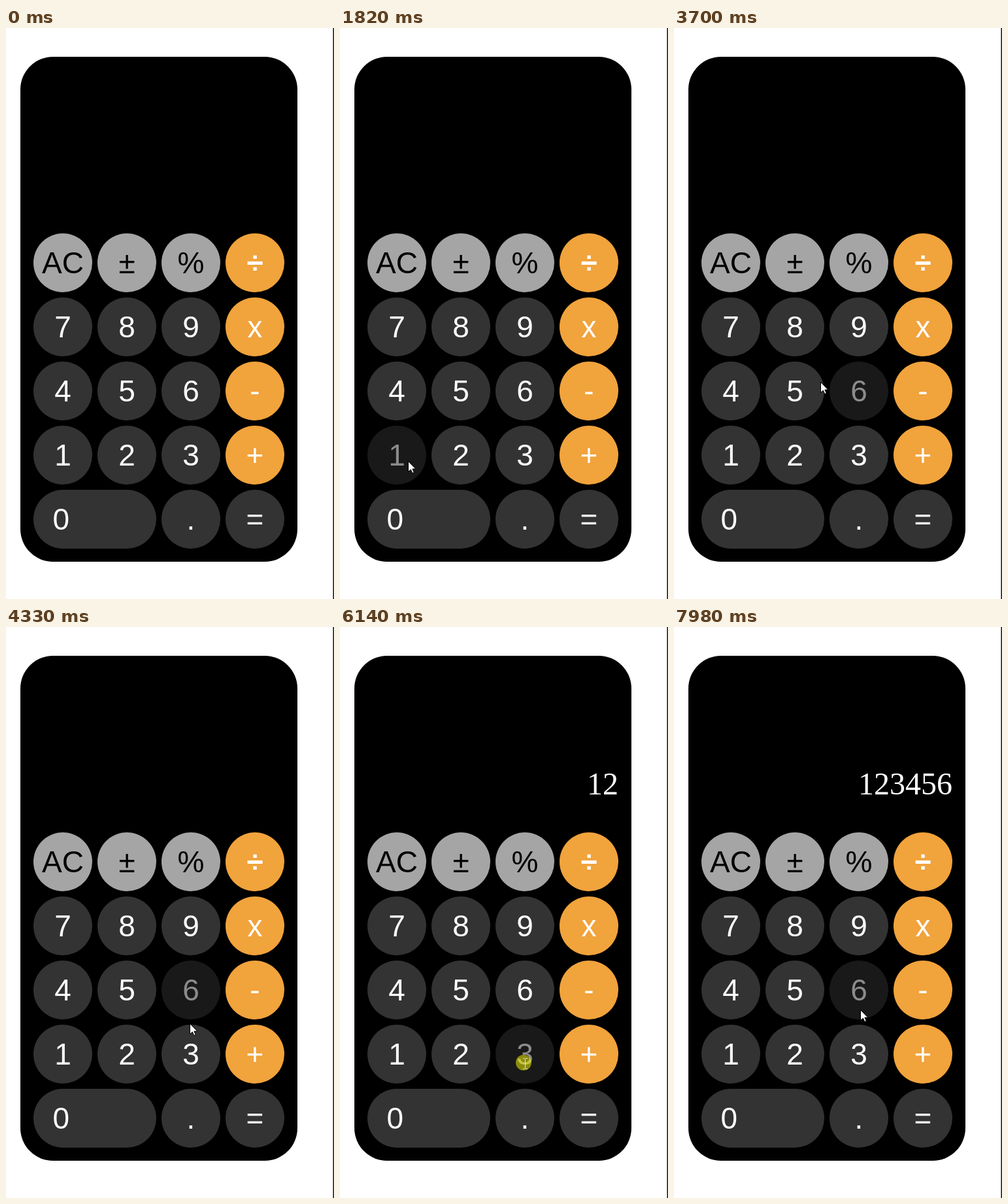
Animation of 502 by 873 pixels, one loop 8000 ms. Source, as an HTML page with a canvas:

```html
<!DOCTYPE html>
<html lang="en">
<head>
<meta charset="utf-8">
<title>Calculator</title>
<style>
html, body { margin: 0; width: 100%; height: 100%; overflow: hidden; background: #fff; }
canvas { display: block; }
</style>
</head>
<body>
<canvas id="stage" width="502" height="873"></canvas>
<script>
const ctx = document.getElementById('stage').getContext('2d');
const LOOP = 8000, STEP = 70, CLICK = 120;
const SIZE = 90, R = SIZE / 2, PITCH = 98, LEFT = 42, TOP = 314;
const GRAY = '#a5a5a5', ORANGE = '#f1a33c', DARK = '#333333';

const rows = ['A±%÷', '789x', '456-', '123+', '0 .='];
const keys = rows.flatMap((row, r) => [...row].map((char, c) => ({
  label: char === 'A' ? 'AC' : char,
  x: LEFT + c * PITCH,
  y: TOP + r * PITCH,
  w: char === '0' ? SIZE + PITCH : SIZE,
  fill: char === '=' ? DARK : c === 3 ? ORANGE : r === 0 ? GRAY : DARK,
  ink: r === 0 && c < 3 ? '#000' : '#fff'
}))).filter(key => key.label !== ' ');

// Times at which the regular screen updates restart
const starts = [420, 2090, 5020, 5810, 6140, 6880, 7700];

// Each click types the next digit
const clicks = [5020, 5270, 6140, 6880, 7200, 7700];

// Pointer path: time, x, y
const path = [
  [420, 470, 840], [490, 427, 691], [1050, 118, 469], [1260, 118, 470],
  [1540, 126, 600], [1820, 104, 662], [2090, 104, 662], [2580, 300, 655],
  [2720, 329, 652], [2860, 310, 655], [3140, 120, 640], [3280, 85, 565],
  [3560, 270, 550], [3700, 224, 541], [3950, 95, 460], [4150, 265, 455],
  [4370, 285, 640], [4540, 190, 664], [4820, 95, 668], [5080, 95, 668],
  [5150, 157, 659], [5353, 190, 664], [5620, 283, 667], [6210, 283, 667],
  [6670, 92, 568], [6963, 92, 568], [7130, 185, 568], [7297, 190, 568],
  [7630, 277, 572], [7770, 277, 573], [7980, 285, 585]
];

function heldTime(t) {
  const start = starts.filter(s => s <= t).pop();
  return start ? start + Math.floor((t - start + 12) / STEP) * STEP : 0;
}

function pointerAt(t) {
  const i = path.findIndex(p => p[0] > t);
  if (i < 0) return path[path.length - 1].slice(1);
  if (i === 0) return path[0].slice(1);
  const [t0, x0, y0] = path[i - 1], [t1, x1, y1] = path[i];
  const k = (t - t0) / (t1 - t0);
  return [x0 + (x1 - x0) * k, y0 + (y1 - y0) * k];
}

function inside(key, [x, y]) {
  const cx = Math.max(key.x + R, Math.min(key.x + key.w - R, x));
  return Math.hypot(x - cx, y - key.y - R) <= R;
}

function roundBox(x, y, w, h, r, fill) {
  ctx.fillStyle = fill;
  ctx.beginPath();
  ctx.roundRect(x, y, w, h, r);
  ctx.fill();
}

function drawKey(key, dim) {
  const wide = key.w > SIZE;
  ctx.globalAlpha = dim ? 0.5 : 1;
  roundBox(key.x, key.y, key.w, SIZE, R, key.fill);
  ctx.fillStyle = key.ink;
  ctx.font = (key.label === '÷' ? 'bold ' : '') + '46px "Liberation Sans", Arial, sans-serif';
  ctx.textAlign = wide ? 'left' : 'center';
  ctx.fillText(key.label, key.x + (wide ? 29.5 : R), key.y + 61);
  ctx.globalAlpha = 1;
}

function drawArrow(x, y) {
  ctx.save();
  ctx.translate(x, y);
  const shape = new Path2D('M.5 .5V16.5L4.3 13.1L6.8 18.5L9.3 17.5L6.9 12.1H11.8Z');
  ctx.fillStyle = '#fff';
  ctx.fill(shape);
  ctx.strokeStyle = '#000';
  ctx.lineWidth = 1;
  ctx.stroke(shape);
  ctx.restore();
}

function drawBeam(x, y) {
  ctx.strokeStyle = '#e8e8d0';
  ctx.lineWidth = 1;
  ctx.beginPath();
  for (const side of [-1, 1]) {
    ctx.moveTo(x - 3.5, y + side * 8);
    ctx.lineTo(x - 1, y + side * 8);
    ctx.lineTo(x, y + side * 7);
    ctx.lineTo(x + 1, y + side * 8);
    ctx.lineTo(x + 3.5, y + side * 8);
  }
  ctx.moveTo(x, y - 7);
  ctx.lineTo(x, y + 7);
  ctx.stroke();
}

function drawPointer(t) {
  const [x, y] = pointerAt(t).map(Math.round);
  if (clicks.some(c => t >= c && t < c + CLICK)) {
    roundBox(x - 14, y - 13, 24, 24, 12, 'rgba(255, 255, 0, 0.5)');
  }
  const overText = keys.some(k => k.w === SIZE &&
    Math.abs(x - k.x - R) < 13 && Math.abs(y - k.y - R) < 26);
  if (overText) drawBeam(x + 0.5, y + 0.5);
  else drawArrow(x, y);
}

function draw(now) {
  const t = heldTime(now % LOOP);
  ctx.fillStyle = '#fff';
  ctx.fillRect(0, 0, 502, 873);
  ctx.fillStyle = '#111';
  ctx.fillRect(500.5, 0, 1.5, 873);
  roundBox(22, 44, 424, 772, 50, '#000');

  const typed = '123456'.slice(0, clicks.filter(c => t >= c + CLICK).length);
  ctx.fillStyle = '#fff';
  ctx.font = '48px "Liberation Serif", "Times New Roman", serif';
  ctx.textAlign = 'right';
  ctx.fillText(typed, 426, 256);

  // Hover styling trails the pointer slightly
  const hover = pointerAt(t - 60);
  for (const key of keys) drawKey(key, t > 0 && inside(key, hover));
  if (t > 0) drawPointer(t);
}

const begin = performance.now();
function tick() {
  draw(performance.now() - begin);
  requestAnimationFrame(tick);
}
tick();
</script>
</body>
</html>
```
